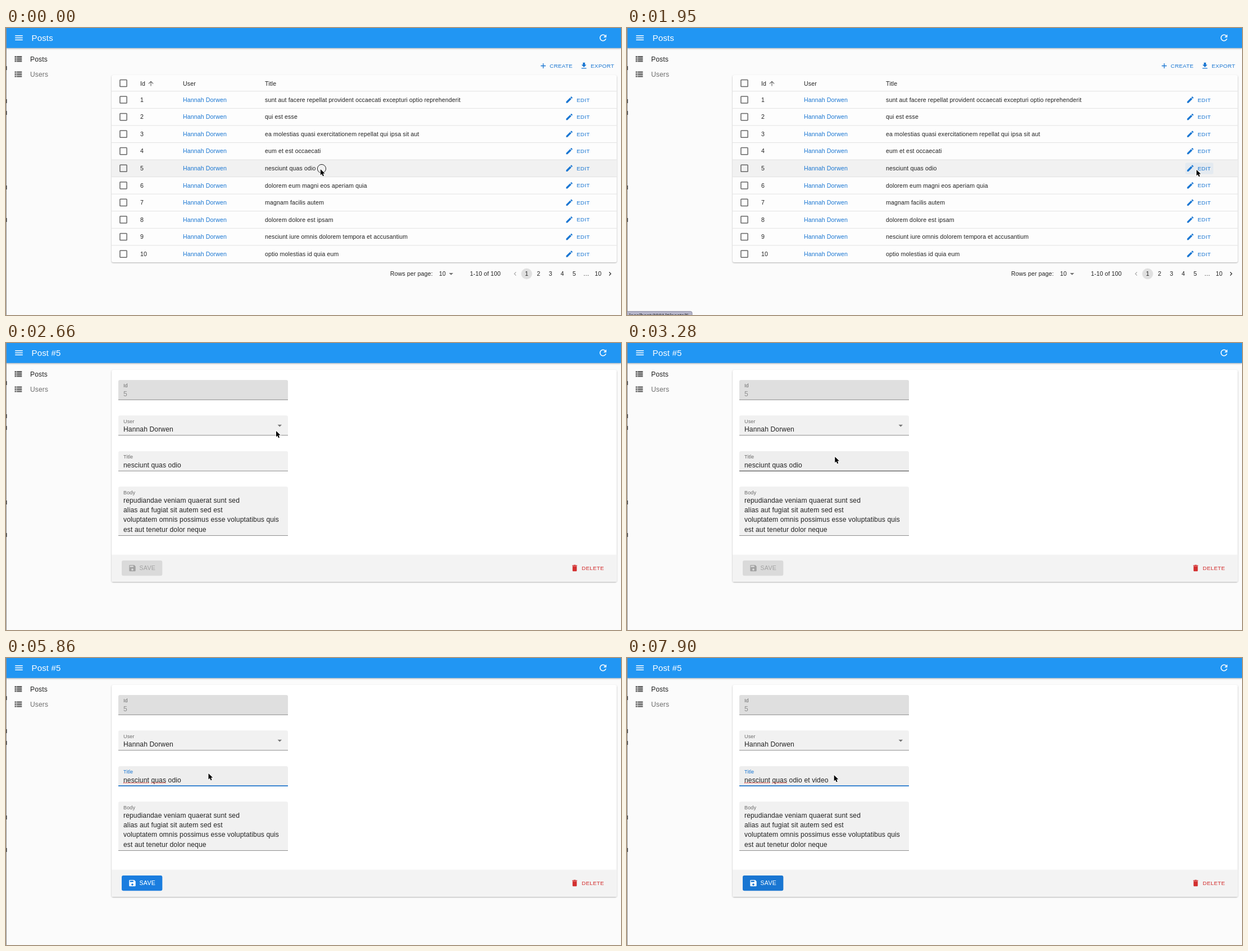
These frames come from a looping animation (1095x512 px, 7.99 s). An HTML page:

```html
<!DOCTYPE html>
<html lang="en">
<head>
<meta charset="utf-8">
<title>Posts admin</title>
<style>
html, body { margin: 0; width: 100%; height: 100%; overflow: hidden; background: #fbfbfb; }
svg { display: block; width: 100%; height: 100%; }
text { font: 10.6px "Liberation Sans", Arial, sans-serif; letter-spacing: .0107em; fill: #222; white-space: pre; }
.title { font-size: 15.1px; letter-spacing: .0075em; fill: #fff; }
.body { font-size: 12.1px; letter-spacing: .0094em; }
.label { font-size: 9.08px; letter-spacing: .0094em; fill: #6b6b6b; }
.button { font-size: 9.83px; letter-spacing: .0286em; fill: inherit; }
.save { font-size: 10.6px; letter-spacing: .0286em; fill: inherit; }
.mid { text-anchor: middle; }
.paper { filter: drop-shadow(0 1px 1px rgba(0, 0, 0, .3)); }
</style>
</head>
<body>
<svg id="stage" viewBox="0 0 1095 512"></svg>
<script>
const LOOP = 7990, TICK = 88.78;
const USER = 'Hannah Dorwen', BLUE = '#1976d2';
const TITLES = [
  'sunt aut facere repellat provident occaecati excepturi optio reprehenderit',
  'qui est esse',
  'ea molestias quasi exercitationem repellat qui ipsa sit aut',
  'eum et est occaecati',
  'nesciunt quas odio',
  'dolorem eum magni eos aperiam quia',
  'magnam facilis autem',
  'dolorem dolore est ipsam',
  'nesciunt iure omnis dolorem tempora et accusantium',
  'optio molestias id quia eum'
];
const BODY = [
  'repudiandae veniam quaerat sunt sed',
  'alias aut fugiat sit autem sed est',
  'voluptatem omnis possimus esse voluptatibus quis',
  'est aut tenetur dolor neque'
];
// Material icons on a 24 unit grid
const ICONS = {
  menu: 'M3 18h18v-2H3zm0-5h18v-2H3zm0-7v2h18V6z',
  list: 'M4 14h4v-4H4zm0 5h4v-4H4zM4 9h4V5H4zm5 5h12v-4H9zm0 5h12v-4H9zM9 5v4h12V5z',
  refresh: 'M17.65 6.35C16.2 4.9 14.21 4 12 4c-4.42 0-7.99 3.58-7.99 8s3.57 8 7.99 8c3.73 0 6.84-2.55 7.73-6h-2.08c-.82 2.33-3.04 4-5.65 4-3.31 0-6-2.69-6-6s2.69-6 6-6c1.66 0 3.14.69 4.22 1.78L13 11h7V4z',
  add: 'M19 13h-6v6h-2v-6H5v-2h6V5h2v6h6z',
  download: 'M19 9h-4V3H9v6H5l7 7zM5 18v2h14v-2z',
  edit: 'M3 17.25V21h3.75L17.81 9.94l-3.75-3.75zM20.71 7.04c.39-.39.39-1.02 0-1.41l-2.34-2.34c-.39-.39-1.02-.39-1.41 0l-1.83 1.83 3.75 3.75z',
  up: 'M4 12l1.41 1.41L11 7.83V20h2V7.83l5.58 5.59L20 12l-8-8z',
  prev: 'M15.41 7.41L14 6l-6 6 6 6 1.41-1.41L10.83 12z',
  next: 'M10 6L8.59 7.41 13.17 12l-4.58 4.59L10 18l6-6z',
  drop: 'M7 10l5 5 5-5z',
  save: 'M17 3H5c-1.11 0-2 .9-2 2v14c0 1.1.89 2 2 2h14c1.1 0 2-.9 2-2V7zm-5 16c-1.66 0-3-1.34-3-3s1.34-3 3-3 3 1.34 3 3-1.34 3-3 3zm3-10H5V5h10z',
  trash: 'M6 19c0 1.1.9 2 2 2h8c1.1 0 2-.9 2-2V7H6zM19 4h-3.5l-1-1h-5l-1 1H5v2h14z'
};

const text = (x, y, s, attrs = '') => `<text x="${x}" y="${y}" ${attrs}>${s}</text>`;
const rect = (x, y, w, h, fill, attrs = '') =>
  `<rect x="${x}" y="${y}" width="${w}" height="${h}" fill="${fill}" ${attrs}/>`;
// px is the icon's drawn size, centred on cx, cy
const icon = (name, cx, cy, px, fill = 'inherit') =>
  `<path d="${ICONS[name]}" fill="${fill}" transform="translate(${cx - px / 2} ${cy - px / 2}) scale(${px / 24})"/>`;
const button = (name, cx, cy, x, label, fill = BLUE) =>
  `<g fill="${fill}">${icon(name, cx, cy, 15.1)}${text(x, cy + 3.5, label, 'class="button"')}</g>`;
const checkbox = cy =>
  rect(202.9, cy - 6.1, 12.2, 12.2, 'none', 'rx=".8" stroke="#666" stroke-width="1.5"');

const ROW = 30.56, HEAD = 112.8;
const row = (title, i) => {
  const top = HEAD + i * ROW, cy = top + 15.2, base = cy + 3.8;
  return rect(188, top, 899.5, ROW, '#f1f1f1', 'class="hover"') +
    (i === 4 ? rect(994, cy - 10, 50, 20.5, BLUE, 'id="editHover" rx="3"') : '') +
    rect(188, top - .5, 899.5, 1, '#e2e2e2') + checkbox(cy) +
    text(239, base, i + 1) + text(315, base, USER, `style="fill:${BLUE}"`) +
    text(461, base, title) + button('edit', 1003, cy, 1016, 'EDIT');
};

const pages = ['1', '2', '3', '4', '5', '…', '10'];
const listView = `
  ${button('add', 956.5, 67.5, 968, 'CREATE')}${button('download', 1029, 67.5, 1041, 'EXPORT')}
  ${rect(188, 84, 899.5, 334, '#fdfdfd', 'rx="3" class="paper"')}
  ${checkbox(98.5)}${text(239, 102.5, 'Id')}${icon('up', 258, 99, 13.6, '#666')}
  ${text(315, 102.5, 'User')}${text(461, 102.5, 'Title')}
  ${TITLES.map(row).join('')}
  ${text(684, 442.3, 'Rows per page:')}${text(771, 442.3, '10')}${icon('drop', 792.5, 438.6, 18.1, '#757575')}
  ${text(826, 442.3, '1-10 of 100')}
  ${icon('prev', 906.5, 438.5, 13.6, '#aaa')}${icon('next', 1075.5, 438.5, 13.6, '#222')}
  <circle cx="927" cy="438.5" r="9.7" fill="#e0e0e0"/>
  ${pages.map((p, i) => text(927 + i * 21.2, 442.3, p, 'class="mid"')).join('')}`;

const field = (id, y, h, label, fill = '#f1f1f1') =>
  `<path id="${id}" d="${fieldPath(y, h)}" fill="${fill}"/>` +
  rect(200, y + h - 1, 302, 1, '#8e8e8e', `id="${id}Line"`) +
  text(209, y + 13.2, label, `class="label" id="${id}Label"`);
function fieldPath(y, h) {
  return `M200 ${y + h}V${y + 3}q0-3 3-3h296q3 0 3 3V${y + h}z`;
}
const saveButton = (id, bg, fg) => `<g id="${id}" fill="${fg}">
  ${rect(206, 388, 72.3, 27.3, bg, 'rx="3"')}${icon('save', 225, 401.6, 15.1)}
  ${text(237.5, 405.3, 'SAVE', 'class="save"')}</g>`;

const formView = `
  ${rect(188, 48, 899.5, 378, '#fff', 'id="card" rx="3" class="paper"')}
  ${field('idField', 66, 35.8, 'Id', '#dfdfdf')}${text(209, 94.8, '5', 'class="body" style="fill:#8f8f8f"')}
  ${field('userField', 129.3, 35.8, 'User')}${text(209, 158, USER, 'class="body"')}
  ${icon('drop', 487.3, 147.2, 18.1, '#757575')}
  ${field('titleField', 193, 35.8, 'Title')}
  ${rect(200, 227.3, 302, 1.6, BLUE, 'id="focusLine"')}
  ${text(209, 221.5, '', 'class="body" id="value"')}
  <path id="spelling" d="M209 222.7H255M258.5 222.7H285" stroke="#e2453c" stroke-width="1.4" stroke-dasharray="1.5 1.2"/>
  ${rect(0, 210.5, 1, 13, '#222', 'id="caret"')}
  ${field('bodyField', 256.3, 87.7, 'Body')}
  ${BODY.map((s, i) => text(209, 284.7 + i * 17.35, s, 'class="body"')).join('')}
  <g id="footer">
    ${rect(188, 377.6, 899.5, 48.2, '#f3f3f3')}
    ${saveButton('saveOff', '#dadada', '#a2a2a2')}${saveButton('saveOn', BLUE, '#fff')}
    ${button('trash', 1012.5, 401.5, 1025, 'DELETE', '#d32f2f')}
  </g>`;

document.getElementById('stage').innerHTML = `
  ${rect(0, 0, 1095, 512, '#fbfbfb')}
  <g id="list">${listView}</g><g id="form">${formView}</g>
  ${icon('list', 21.5, 55.2, 18.1, '#666')}${text(43, 59.5, 'Posts', 'class="body"')}
  ${icon('list', 21.5, 82.5, 18.1, '#757575')}${text(43, 86.8, 'Users', 'class="body" style="fill:#707070"')}
  ${rect(0, -5, 1095, 40.7, '#2196f3', 'style="filter:drop-shadow(0 1.5px 1.5px rgba(0,0,0,.3))"')}
  ${icon('menu', 23, 17.5, 18.1, '#fff')}${text(45.5, 22.8, '', 'class="title" id="heading"')}
  <g id="refresh">${icon('refresh', 1063, 17.5, 18.1, '#fff')}</g>
  <path id="spinner" fill="none" stroke="#fff" stroke-width="1.6"/>
  ${rect(0, 0, 1, 512, '#8d8d8d')}
  ${[72, 131, 152, 285, 343].map(y => rect(0, y - 4, 1.5, 7, '#333')).join('')}
  <g id="status"><path d="M0 505.5H113q3 0 3 3V513H0z" fill="#b4b4c8" stroke="#85859a" stroke-width=".8"/>
    ${text(4, 516.2, 'localhost:3001/#/posts/5', 'style="font-size:9.6px"')}</g>
  <circle id="ring" cx="562" cy="251" r="7.6" fill="none" stroke="#222"/>
  <path id="cursor" d="M0 0v10.6l2.4-2.3 1.7 3.9 1.9-.8-1.7-3.8h3.4z" stroke="#fff" stroke-width="1.6" paint-order="stroke"/>`;

const el = id => document.getElementById(id);
const set = (id, attrs) => { for (const k in attrs) el(id).setAttribute(k, attrs[k]); };
const show = (id, opacity) => set(id, { opacity: Number(opacity) });
const ramp = (n, from, to) => Math.min(1, Math.max(0, (n - from) / (to - from)));
const within = (n, a, b) => n >= a && n < b;

// Pointer keys: tick, x, y
const PATH = [
  [0, 560, 252], [1, 566, 251], [3, 566, 251], [5, 640, 242], [7, 800, 221], [9, 940, 228],
  [10, 1000, 256], [11, 1013, 251], [21, 1013, 251], [22, 1014, 253], [25, 1014, 253],
  [26, 970, 245], [28, 700, 195], [29, 550, 167], [30, 481, 157], [31, 479, 158], [32, 479, 158],
  [34, 440, 175], [36, 380, 200], [38, 360.5, 206], [87, 360.5, 206], [89, 368.7, 209]
];
function pointer(n) {
  const i = PATH.findIndex(k => k[0] > n);
  if (i < 0) return PATH[PATH.length - 1].slice(1);
  const [a, x, y] = PATH[i - 1], [b, u, v] = PATH[i], f = ramp(n, a, b);
  return [x + (u - x) * f, y + (v - y) * f];
}

const TYPED = [[0, ''], [57, ' '], [58, '  '], [66, ' '], [67, ' e'], [69, ' et'], [72, ' et '],
  [77, ' et v'], [79, ' et vi'], [80, ' et vid'], [82, ' et vide'], [83, ' et video']];

function draw(n) {
  const editing = n >= 25, focused = n >= 40;
  const [x, y] = pointer(n);
  set('cursor', { transform: `translate(${x} ${y})` });
  show('ring', n < 1);
  show('list', !editing);
  show('form', editing);
  el('heading').textContent = editing ? 'Post #5' : 'Posts';

  const hovered = Math.floor((y - HEAD) / ROW);
  document.querySelectorAll('.hover').forEach((r, i) => r.setAttribute('opacity', Number(i === hovered)));
  show('editHover', .06 * ramp(n, 13, 17));
  show('status', n < 27 ? .5 * ramp(n, 13, 14) + .5 * ramp(n, 14, 17) : 1 - ramp(n, 26, 29));

  show('refresh', !within(n, 25, 28));
  show('spinner', within(n, 25, 28));
  const a = (n - 25) * 1.6 + .1;
  set('spinner', { d: `M1069 17.5A6 6 0 0 1 ${1063 + 6 * Math.cos(a)} ${17.5 + 6 * Math.sin(a)}` });

  // The body field opens one line too tall, then fits its text
  const extra = n < 26 ? 17.35 : 0;
  set('card', { height: 378 + extra });
  set('bodyField', { d: fieldPath(256.3, 87.7 + extra) });
  set('bodyFieldLine', { y: 343 + extra });
  set('footer', { transform: `translate(0 ${extra})` });

  set('titleField', { fill: n >= 36 ? '#eee' : '#f1f1f1' });
  set('titleFieldLine', { fill: within(n, 36, 40) ? '#333' : '#8e8e8e' });
  el('titleFieldLabel').style.fill = focused ? BLUE : '';
  const w = 302 * ramp(n, 39, 42);
  set('focusLine', { x: 351 - w / 2, width: w });
  show('spelling', focused);

  el('value').textContent = TITLES[4] + TYPED.filter(k => k[0] <= n).pop()[1];
  set('caret', { x: 208.6 + el('value').getComputedTextLength() });
  show('caret', within(n, 40, 46) || within(n, 52, 63) || within(n, 67, 88));
  show('saveOn', ramp(n, 56, 59));
  set('saveOn', { style: n < 67 ? 'filter:brightness(1.06)' : '' });
}

let last = -1;
function frame() {
  const n = Math.floor((performance.now() % LOOP + 14) / TICK);
  if (n !== last) draw(last = n);
  requestAnimationFrame(frame);
}
frame();
</script>
</body>
</html>
```
